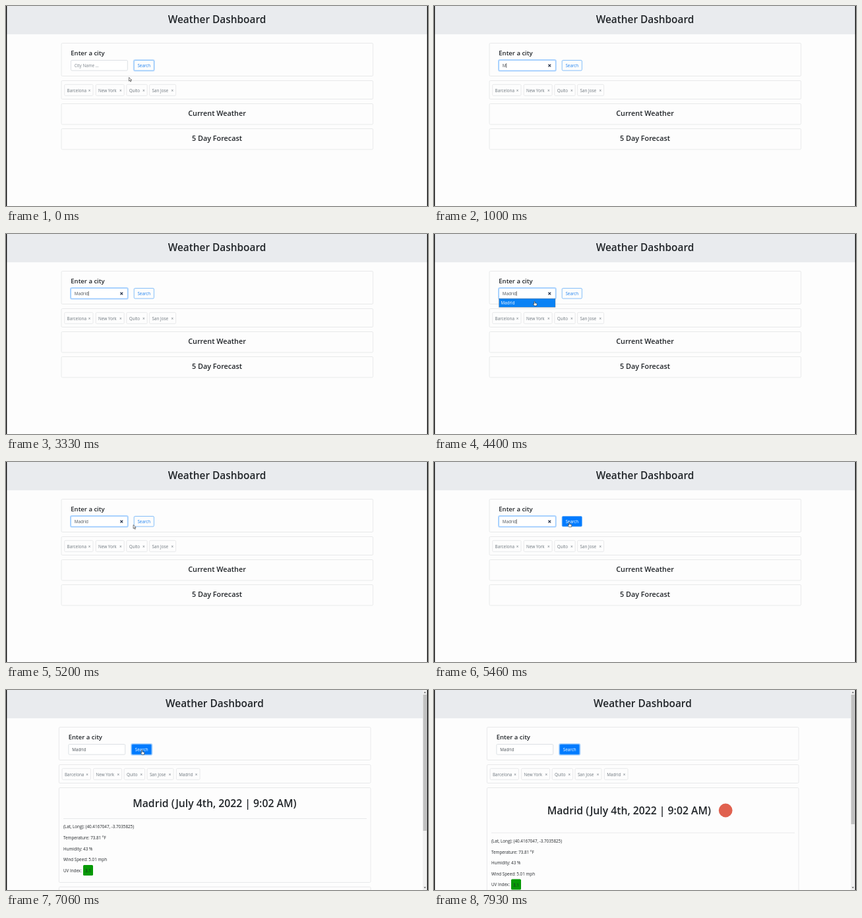
An HTML page for the animation above (8000 ms loop, 640 px wide and 304 px high).

```html
<!DOCTYPE html>
<html lang="en">
<head>
<meta charset="utf-8">
<title>Weather Dashboard</title>
<style>
  html, body { margin: 0; width: 100%; height: 100%; overflow: hidden; background: #fdfdfd; }
  svg { display: block; font: 6.3px "Open Sans", "Noto Sans", sans-serif; fill: #212529; }
  text { white-space: pre; }
  .h1, .h3, .h4 { font-weight: 600; }
  .h1 { font-size: 15.4px; }
  .h3 { font-size: 10.84px; }
  .h4 { font-size: 9.5px; }
  .mid { text-anchor: middle; }
  .card, .chip rect { fill: none; stroke: #e4e5e6; stroke-width: .8; }
  .chip { fill: #6c757d; }
  .ring { fill: none; stroke: #007bff; stroke-opacity: .3; stroke-width: 1.6; }
  .pointer { fill: #fff; stroke: #222; stroke-width: .6; stroke-linejoin: round; }
</style>
</head>
<body>
<svg width="640" height="304" viewBox="0 0 640 304">
  <rect width="640" height="43" fill="#e9ebee"/>
  <g id="page">
    <text class="h1 mid" x="320" y="26.4">Weather Dashboard</text>
    <rect class="card" x="84" y="56.5" width="472.6" height="50" rx="1.5"/>
    <rect class="card" x="84" y="113.5" width="472.6" height="28" rx="1.5"/>
    <rect class="card" id="current" x="84" y="148.5" width="472.6" height="31.5" rx="1.5"/>
    <rect class="card" id="forecast" x="84" y="186.5" width="472.6" height="31.5" rx="1.5"/>
    <text class="h4" x="98.3" y="75.3">Enter a city</text>

    <rect class="ring" id="inputRing" x="97.8" y="81.8" width="87.2" height="17" rx="2"/>
    <rect id="input" x="98.5" y="82.5" width="85.8" height="15.6" rx="1.5" fill="#fff" stroke-width=".7"/>
    <text id="typed" x="103.8" y="93"></text>
    <path id="caret" d="M0 87v7" stroke="#222" stroke-width=".6"/>
    <path id="clear" d="M173.4 88.6l3.8 3.8m0-3.8l-3.8 3.8" stroke="#1d2a44" stroke-width="1.2"/>

    <rect class="ring" id="buttonRing" x="193.5" y="81.8" width="31.6" height="17" rx="2"/>
    <rect id="button" x="194.2" y="82.5" width="30.2" height="15.6" rx="1.5" stroke="#68aff8" stroke-width=".8"/>
    <text class="mid" id="label" x="209.3" y="93">Search</text>

    <g id="chips"></g>
    <g id="empty">
      <text class="h3 mid" x="320" y="167">Current Weather</text>
      <text class="h3 mid" x="320" y="205.2">5 Day Forecast</text>
    </g>
    <g id="list">
      <rect id="option" x="98.5" y="98.2" width="85.5" height="13" stroke="#777" stroke-width=".4"/>
      <text id="optionText" x="101.5" y="107">Madrid</text>
    </g>
  </g>

  <g id="result">
    <text class="h1 mid" id="heading" style="font-size:15.75px">Madrid (July 4th, 2022 | 9:02 AM)</text>
    <circle id="icon" cx="442.2" cy="183" r="10.4" fill="#e0614f"/>
    <g id="details">
      <path d="M87 195.5H547" stroke="#e4e5e6" stroke-width=".8"/>
      <g id="rows"></g>
      <rect x="117" y="266" width="15" height="16" rx="1.6" fill="#069a06"/>
      <text class="mid" x="124.5" y="277">3.1</text>
    </g>
    <rect x="632" width="7" height="304" fill="#f1f1f1"/>
    <rect id="thumb" x="632.6" y="7" width="5.4" fill="#c1c1c1"/>
    <path d="M633.6 4.6l1.7-2 1.7 2zM633.6 299.4l1.7 2 1.7-2z" fill="#555"/>
  </g>
  <path d="M0 0h1.3v304H0zM638.7 0H640v304h-1.3z" fill="#000"/>

  <path class="pointer" id="arrow" d="M0 0v5.6l1.3-1.2 1 2.2 1-.5-1-2.1h1.8z"/>
  <path class="pointer" id="ibeam" d="M-1.2-3h2.4M0-3v6M-1.2 3h2.4"/>
  <path class="pointer" id="hand" d="M-.6.5q.6-.9 1.2 0v2.2l2.6.6q.6.2.5 1l-.5 2.6H-.4L-2.2 4.4q0-.9.8-.6l.8.6z"/>
</svg>
<script>
const LOOP = 8000, BLINK = 530;
const FOCUS = 460, HOVER = 5300, CLICK = 5830, RESULT = 7060, ICON = 7200;
const LIST = [3660, 4660];

// [time, field text]; the caret blink restarts at each
const KEYS = [[FOCUS, ""], [1000, "M"], [1200, "Ma"], [1600, "Mad"], [1800, "Madr"],
  [2000, "Madri"], [2200, "Madrif"], [3060, "Madri"], [3330, "Madrid"]];

// [time, x, y] of the pointer tip
const PATH = [[60, 186.5, 108.5], [460, 151, 91], [660, 148, 91], [4400, 152.5, 102.2],
  [4600, 153, 103], [4730, 158, 106], [5100, 158, 106], [5200, 193, 95.6],
  [5330, 203, 93], [5530, 206.3, 91.2]];

const CHIPS = [["Barcelona", 88.7, 43.3], ["New York", 136.2, 43], ["Quito", 182.8, 31.4],
  ["San Jose", 217.6, 40], ["Madrid", 262, 35.6]];
const ROWS = ["(Lat, Long): (40.4167047, -3.7035825)", "Temperature: 73.81 °F",
  "Humidity: 43 %", "Wind Speed: 5.01 mph", "UV Index:"];

const $ = id => document.getElementById(id);
const show = (id, on) => { $(id).style.display = on ? "" : "none"; };
const set = (id, attrs) => { for (const k in attrs) $(id).setAttribute(k, attrs[k]); };
const mix = (a, b, k) => a + (b - a) * k;
const clamp = v => Math.min(1, Math.max(0, v));

$("chips").innerHTML = CHIPS.map(([name, x, w], i) =>
  `<g class="chip" id="chip${i}"><rect x="${x}" y="119.3" width="${w}" height="17" rx="1.5"/>
   <text x="${x + 3.9}" y="130.5">${name}</text>
   <text class="mid" x="${x + w - 5.4}" y="130.5">×</text></g>`).join("");
$("rows").innerHTML = ROWS.map((row, i) =>
  `<text x="87" y="${210.4 + i * 16.55}">${row}</text>`).join("");

function pointerAt(t) {
  const next = PATH.findIndex(p => p[0] > t);
  if (next === 0) return PATH[0].slice(1);
  if (next < 0) return PATH[PATH.length - 1].slice(1);
  const [t0, x0, y0] = PATH[next - 1], [t1, x1, y1] = PATH[next];
  const k = (t - t0) / (t1 - t0);
  return [mix(x0, x1, k), mix(y0, y1, k)];
}

function drawField(t) {
  const focused = t >= FOCUS && t < CLICK;
  const [since, text] = KEYS.filter(k => k[0] <= t).pop() || [0, ""];
  const typed = $("typed");
  typed.textContent = text || "City Name ...";
  set("typed", { fill: text ? "#495057" : "#7a828a" });
  set("input", { stroke: focused ? "#80bdff" : "#ced4da" });
  show("inputRing", focused);
  show("clear", focused && text);
  show("caret", focused && Math.floor((t - since) / BLINK) % 2 === 0);
  const width = text ? typed.getComputedTextLength() : 0;
  set("caret", { transform: `translate(${104.1 + width})` });

  const chosen = t >= 4400;
  show("list", t >= LIST[0] && t < LIST[1]);
  set("option", { fill: chosen ? "#0a82f5" : "#fff" });
  set("optionText", { fill: chosen ? "#fff" : "#212529" });
}

function drawButton(t) {
  const k = clamp((t - HOVER) / 150);
  set("button", { fill: `rgb(${mix(253, 0, k)},${mix(253, 123, k)},${mix(253, 255, k)})` });
  set("label", { fill: `rgb(${mix(30, 255, k)},${mix(130, 255, k)},${mix(240, 255, k)})` });
  $("buttonRing").style.opacity = t < FOCUS ? .6 : clamp((t - CLICK) / 150) * 1.6;
}

function drawResult(t) {
  const done = t >= RESULT, icon = t >= ICON, drop = icon ? 21.6 : 0;
  set("page", { transform: `translate(${done ? -3.6 : 0})` });
  show("empty", !done);
  show("chip4", done);
  show("result", done);
  show("icon", icon);
  set("current", { height: done ? 144 + drop : 31.5 });
  set("forecast", { y: done ? 299.3 + drop : 186.5 });
  set("heading", { x: icon ? 295.8 : 316.3, y: icon ? 189.4 : 178.4 });
  set("details", { transform: `translate(0 ${drop})` });
  set("thumb", { height: icon ? 197 : 207 });
}

function drawPointer(t) {
  const [x, y] = pointerAt(t);
  const visible = t < 1000 || (t >= 4400 && t < 7600);
  const inField = x > 98 && x < 185 && y > 82 && y < 98;
  const shape = inField ? "ibeam" : t >= HOVER || (t >= 4400 && t < LIST[1]) ? "hand" : "arrow";
  for (const id of ["arrow", "ibeam", "hand"]) show(id, visible && id === shape);
  set(shape, { transform: `translate(${x} ${y})` });
}

function frame() {
  const t = performance.now() % LOOP;
  drawField(t);
  drawButton(t);
  drawResult(t);
  drawPointer(t);
  requestAnimationFrame(frame);
}
frame();
</script>
</body>
</html>
```
